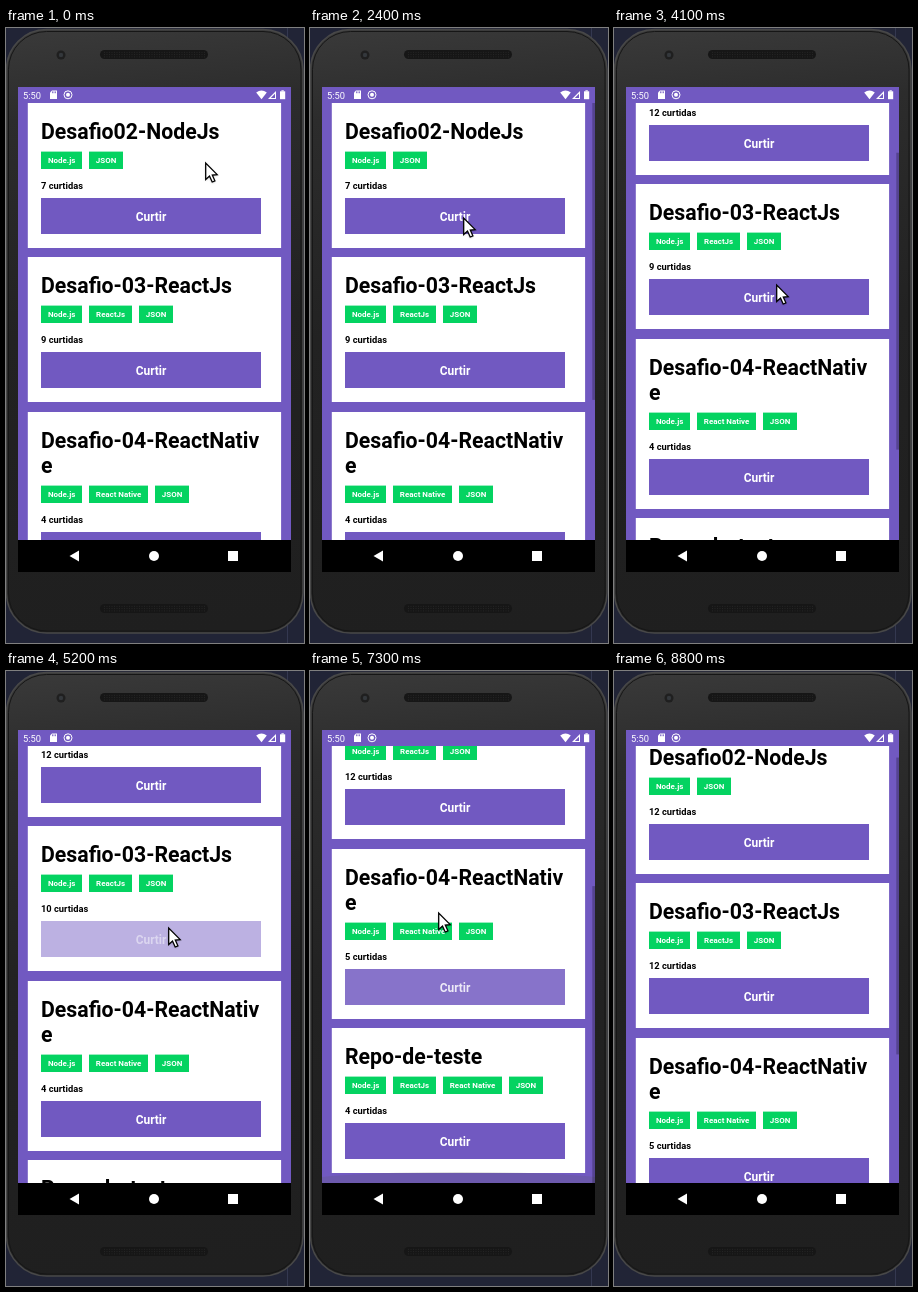
Write an HTML page with a canvas that moves like this. It is 298 px wide and 615 px high and loops after 8.9 s.

```html
<!DOCTYPE html>
<html lang="pt-BR">
<head>
<meta charset="utf-8">
<style>
html, body { margin: 0; height: 100%; overflow: hidden; background: #212436; }
canvas { display: block; }
</style>
</head>
<body>
<canvas id="stage"></canvas>
<script>
const W = 298, H = 615, LOOP = 8900, STEP = 100;
const PURPLE = '#7159c1', GREEN = '#04d361';
const VIEW = { x: 12, y: 75, w: 273, h: 437 };
const LINE = 25, CARD = 144.6, GAP = 9.96;
const canvas = document.getElementById('stage');
const c = canvas.getContext('2d');
const dpr = window.devicePixelRatio || 1;
canvas.width = W * dpr;
canvas.height = H * dpr;
canvas.style.width = W + 'px';
canvas.style.height = H + 'px';

// presses: touch times; likes: how many of them count
const cards = [
  { title: ['Desafio02-NodeJs'], tags: ['Node.js', 'JSON'], count: 7,
    presses: [2910, 3010, 3110, 3210, 3310], likes: 5 },
  { title: ['Desafio-03-ReactJs'], tags: ['Node.js', 'ReactJs', 'JSON'], count: 9,
    presses: [4510, 5110, 6510], likes: 3 },
  { title: ['Desafio-04-ReactNativ', 'e'], tags: ['Node.js', 'React Native', 'JSON'], count: 4,
    presses: [5900, 7015], likes: 1 },
  { title: ['Repo-de-teste'], tags: ['Node.js', 'ReactJs', 'React Native', 'JSON'], count: 4,
    presses: [], likes: 0 }
];
let contentHeight = 0;
for (const card of cards) {
  card.top = contentHeight;
  card.extra = (card.title.length - 1) * LINE;
  contentHeight += CARD + card.extra + GAP;
}
const maxScroll = contentHeight - VIEW.h;

// Moves are [start, end, ...values to reach]
const scrolls = [[3750, 4200, 74], [6950, 7300, maxScroll], [7600, 8500, 17]];
const pointer = [[0, 300, 200, 132], [1900, 2350, 153, 189], [3700, 3850, 164, 330],
  [3850, 4100, 162, 256], [5400, 5800, 138, 436], [5960, 6260, 140, 269], [6600, 6800, 134, 436],
  [6950, 7300, 128, 241], [7600, 8100, 150, 400], [8100, 8500, 210, -26]];

const clamp = v => Math.max(0, Math.min(1, v));
const smooth = p => p * p * (3 - 2 * p);
const easeOut = p => 1 - (1 - p) ** 3;

function follow(from, moves, t, ease) {
  return moves.reduce((pos, [a, b, ...to]) => {
    const p = ease(clamp((t - a) / (b - a)));
    return pos.map((v, i) => v + (to[i] - v) * p);
  }, from);
}

// Fades in after a, out after b
function pulse(t, a, b, fadeIn, fadeOut) {
  return Math.min(clamp((t - a) / fadeIn), 1 - clamp((t - b) / fadeOut));
}

function rect(x, y, w, h, fill) {
  c.fillStyle = fill;
  c.fillRect(x, y, w, h);
}

function round(x, y, w, h, r, fill, stroke, width = 1) {
  c.beginPath();
  c.roundRect(x, y, w, h, r);
  if (fill) { c.fillStyle = fill; c.fill(); }
  if (stroke) { c.strokeStyle = stroke; c.lineWidth = width; c.stroke(); }
}

function poly(points, fill) {
  c.beginPath();
  points.forEach(p => c.lineTo(...p));
  c.closePath();
  c.fillStyle = fill;
  c.fill();
}

function disc(x, y, r, fill) {
  c.beginPath();
  c.arc(x, y, r, 0, 7);
  c.fillStyle = fill;
  c.fill();
}

function text(s, x, y, size, fill, weight = 700, align = 'left') {
  c.font = `${weight} ${size}px Roboto, sans-serif`;
  c.textAlign = align;
  c.fillStyle = fill;
  c.fillText(s, x, y);
}

function speaker(y) {
  round(94, y, 108, 9, 4.5, '#161616');
  for (let j = 0; j < 3; j++)
    for (let x = 98; x < 199; x += 2.5) rect(x, y + 1.8 + j * 2.3, 1, 1, '#262626');
}

function phone() {
  rect(0, 0, W, H, '#212436');
  rect(281, 0, 1, H, '#343850');
  const body = c.createLinearGradient(0, 0, 60, H);
  body.addColorStop(0, '#3a3a3a');
  body.addColorStop(.15, '#2c2c2c');
  body.addColorStop(.5, '#222');
  body.addColorStop(1, '#1f1f1f');
  round(.5, 1.5, 296.5, 603.5, 40, body, '#484848', 1.5);
  round(2.5, 3.5, 292.5, 599.5, 38, null, '#161616');
  speaker(22);
  speaker(576);
  disc(55, 27, 4.5, '#1f1f1f');
  disc(55, 27, 2.2, '#34383c');
}

function statusBar() {
  rect(12, 59, 273, 16, PURPLE);
  text('5:50', 17, 70.5, 9.3, '#fff', 400);
  poly([[46, 62.5], [51, 62.5], [51, 71], [44, 71], [44, 64.5]], '#fff');
  for (let i = 0; i < 3; i++) rect(46 + i * 1.6, 63.4, .8, 1.8, PURPLE);
  c.strokeStyle = '#fff';
  c.lineWidth = 1;
  c.beginPath();
  c.arc(62, 66.8, 4, 0, 7);
  c.stroke();
  disc(62, 66.8, 2, '#fff');
  c.beginPath();
  c.moveTo(255.5, 71.3);
  c.lineTo(250.2, 64.6);
  c.quadraticCurveTo(255.5, 60.4, 260.8, 64.6);
  c.fillStyle = '#fff';
  c.fill();
  poly([[262, 71], [270, 63], [270, 71]], '#fff');
  poly([[264.8, 70], [269, 65.8], [269, 70]], PURPLE);
  rect(274, 63.3, 5.2, 7.9, '#fff');
  rect(275.4, 62.3, 2.4, 1.2, '#fff');
}

function navBar() {
  rect(12, 512, 273, 32, '#000');
  poly([[63.5, 528], [73, 522.4], [73, 533.6]], '#fff');
  disc(148, 528, 5, '#fff');
  rect(222, 523, 10, 10, '#fff');
}

function drawCard({ title, tags, count, presses, likes, extra }, y, t) {
  rect(21.8, y, 253.3, 145 + extra, '#fff');
  title.forEach((line, i) => text(line, 35, y + 36.3 + i * LINE, 21.25, '#000'));
  y += extra;
  let x = 35;
  for (const tag of tags) {
    c.font = '700 7.97px Roboto, sans-serif';
    const w = Math.ceil(c.measureText(tag).width) + 13.3;
    rect(Math.round(x), y + 48.6, Math.round(w), 17.4, GREEN);
    text(tag, x + w / 2, y + 60.1, 7.97, '#fff', 700, 'center');
    x += w + 6.64;
  }
  const liked = presses.slice(0, likes).filter(p => t >= p + 250).length;
  text(count + liked + ' curtidas', 35, y + 85.6, 9.3, '#000');
  const last = presses.filter(p => p <= t).pop() ?? -LOOP;
  c.globalAlpha = Math.min(1, .3 + (t - last) * .0019);
  rect(35, y + 95, 220, 36, PURPLE);
  text('Curtir', 145, y + 117.5, 11.95, '#fff', 700, 'center');
  c.globalAlpha = 1;
}

function app(t) {
  const [scroll] = follow([0], scrolls, t, easeOut);
  const bar = Math.max(pulse(t, 1650, 2900, 50, 300), pulse(t, 3750, 4500, 50, 300),
    pulse(t, 6950, LOOP, 50, 300));
  const blank = pulse(t, 600, 1300, 400, 100);
  const glow = pulse(t, 7200, 7300, 100, 400);
  const { x, y, w, h } = VIEW;
  c.save();
  c.beginPath();
  c.rect(x, y, w, h);
  c.clip();
  rect(x, y, w, h, PURPLE);
  if (t < 1400 || t >= 1700)
    cards.forEach(card => drawCard(card, Math.floor(y + card.top - scroll + .2), t));
  c.beginPath();
  c.ellipse(x + w / 2, y + h, w * .6, 11, 0, 0, 7);
  c.fillStyle = `rgba(90,90,90,${.2 * glow})`;
  c.fill();
  const scale = h / contentHeight;
  rect(x + w - 2.7, y + scroll * scale, 2.7, h * scale, `rgba(0,0,0,${.25 * bar})`);
  rect(x, y, w, h, `rgba(250,250,250,${blank})`);
  c.restore();
}

function cursor(x, y) {
  c.save();
  c.translate(x + .7, y + 1);
  c.shadowColor = 'rgba(0,0,0,.35)';
  c.shadowBlur = 2 * dpr;
  c.shadowOffsetY = dpr;
  poly([[0, 0], [0, 16.5], [3.8, 13], [6.5, 19], [9.2, 17.8], [6.6, 12], [11.5, 11.6]], '#fff');
  c.shadowColor = 'transparent';
  c.strokeStyle = '#000';
  c.lineWidth = 1.3;
  c.stroke();
  c.restore();
}

function draw(now) {
  const t = Math.floor(now % LOOP / STEP) * STEP;
  c.setTransform(dpr, 0, 0, dpr, 0, 0);
  phone();
  app(t);
  statusBar();
  navBar();
  cursor(...follow([199, 134], pointer, t, smooth));
}

const start = performance.now();
function tick() {
  draw(performance.now() - start);
  requestAnimationFrame(tick);
}
tick();
</script>
</body>
</html>
```
